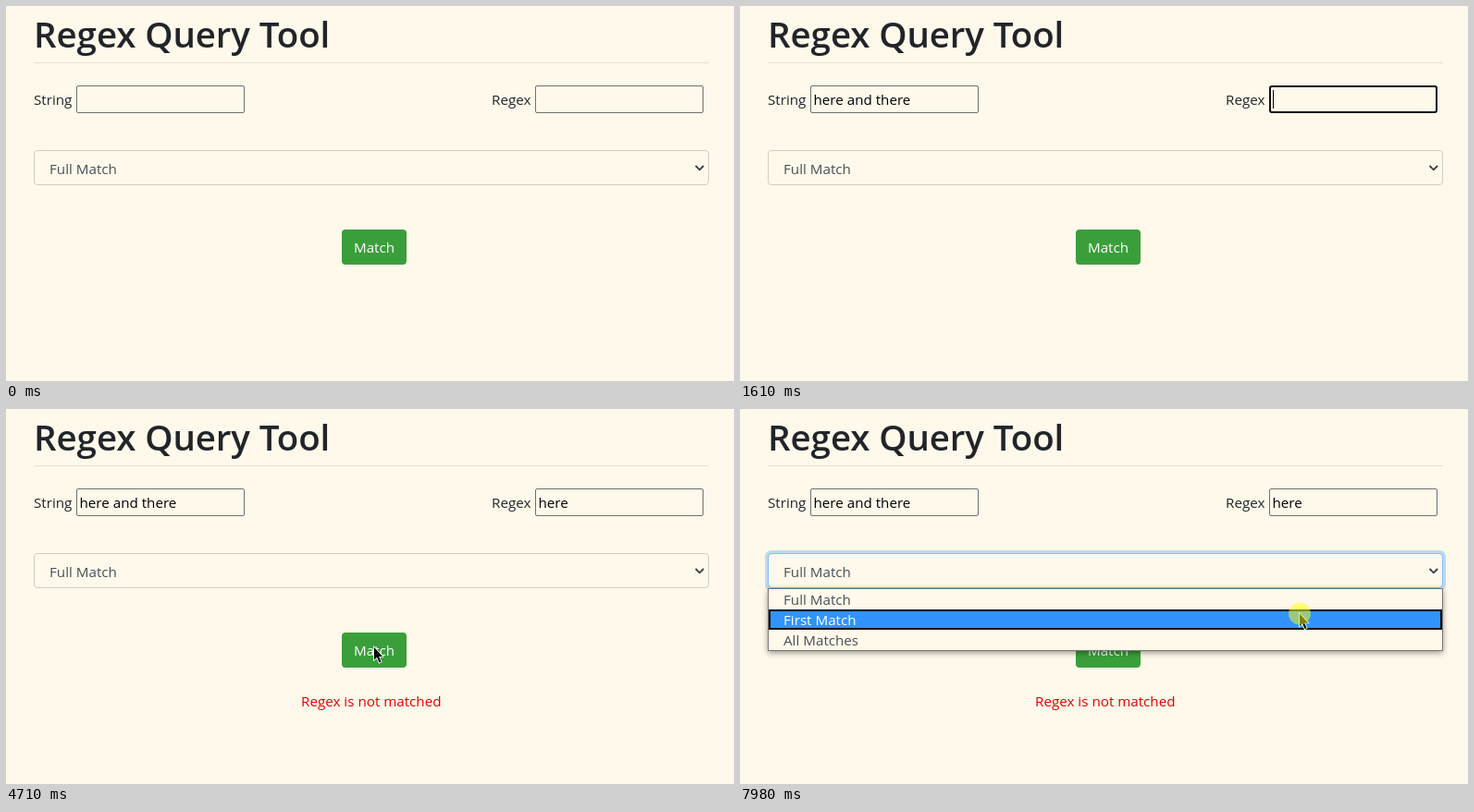
An HTML page that plays this animation: 787x406 px, repeating every 8 s.

```html
<!DOCTYPE html>
<html lang="en">
<head>
<meta charset="utf-8">
<title>Regex Query Tool</title>
<style>
html, body { margin: 0; width: 100%; height: 100%; overflow: hidden; background: #fff9eb; }
svg { display: block; }
text { font: 15.2px 'Open Sans', 'Noto Sans', sans-serif; fill: #212529; white-space: pre; }
.title { font-size: 38.5px; font-weight: 600; letter-spacing: -.1px; }
.typed { fill: #000; }
.opt { fill: #495057; }
.box { fill: none; stroke: #707070; }
.focus { fill: none; stroke: #101010; stroke-width: 2; }
.hint { font-size: 11.8px; font-weight: 700; letter-spacing: -.1px; fill: #ece9e2; }
.panel { fill: #292929; filter: drop-shadow(0 1px 1.5px rgba(0,0,0,.4)); }
.list { fill: #fff9eb; stroke: #767676; filter: drop-shadow(0 2px 3px rgba(0,0,0,.4)); }
</style>
</head>
<body>
<svg id="stage" width="787" height="406" viewBox="0 0 787 406">
  <text class="title" x="30" y="45">Regex Query Tool</text>
  <path d="M30 61.5H760" stroke="#000" stroke-opacity=".1"/>
  <text x="30" y="107">String</text>
  <text x="525" y="107">Regex</text>

  <rect x="30.5" y="156.5" width="729" height="37" rx="3.5" fill="none" stroke="#cfcdc6"/>
  <g id="ring" fill="none">
    <rect x="28.5" y="154.5" width="733" height="41" rx="5" stroke="#007bff" stroke-opacity=".25" stroke-width="3"/>
    <rect x="30.5" y="156.5" width="729" height="37" rx="3.5" stroke="#80bdff"/>
  </g>
  <text class="opt" x="47" y="182">Full Match</text>
  <path d="M745.5 173l4.3 4.3 4.3-4.3" fill="none" stroke="#343a40" stroke-width="1.8"/>

  <rect id="button" x="363" y="242" width="70" height="38" rx="4"/>
  <text x="398" y="267" text-anchor="middle" style="fill:#fff">Match</text>
  <text id="result" x="319" y="322" style="fill:#e00000">Regex is not matched</text>

  <g id="fields"></g>

  <g id="popup">
    <rect class="list" x="30.5" y="194.5" width="729" height="67"/>
    <rect id="row" x="32" width="726" height="20" fill="#3093ff" stroke="#101010" stroke-width="2"/>
  </g>

  <path id="arrow" d="M0 0V13.4L3 10.8 5.6 16.6 7.6 15.7 5.1 10H9Z" stroke="#fff" stroke-width="1.6" paint-order="stroke"/>
  <path id="beam" d="M-3-8H-1L0-7 1-8H3M0-7V7M-3 8H-1L0 7 1 8H3" fill="none" stroke="#222"/>
  <circle id="press" r="12" fill="#ff0" fill-opacity=".5"/>
</svg>
<script>
const LOOP = 8000;
const $ = id => document.getElementById(id);

function add(parent, tag, attrs, text = '') {
  const el = document.createElementNS('http://www.w3.org/2000/svg', tag);
  for (const k in attrs) el.setAttribute(k, attrs[k]);
  el.textContent = text;
  return parent.appendChild(el);
}
const show = (el, on) => el.setAttribute('visibility', on ? 'inherit' : 'hidden');
const within = (t, spans) => spans.some(([a, b]) => t >= a && t < b);
const ramp = (t, start) => Math.min(1, Math.max(0, (t - start) / 150));

const fields = [
  { x: 76, panelX: 75, value: 'here and there',
    keys: [460, 570, 680, 760, 910, 960, 1020, 1070, 1120, 1180, 1230, 1280, 1340, 1390],
    focus: [[210, 1490]], hints: ['here and there', 'Here and there', 'hello'], close: 1490 },
  { x: 572, panelX: 572, value: 'here',
    keys: [1640, 1890, 2050, 2190],
    focus: [[1490, 2990], [6590, 7290]], hints: ['here', 'here.*', 'h.*'], close: 2990 }
];

for (const f of fields) {
  const g = add($('fields'), 'g', {});
  f.box = add(g, 'rect', { class: 'box', x: f.x + .5, y: 86.5, width: 181, height: 29, rx: 1.5 });
  f.outline = add(g, 'rect', { class: 'focus', x: f.x + 1, y: 87, width: 180, height: 28, rx: 2 });
  f.text = add(g, 'text', { class: 'typed', x: f.x + 3.5, y: 107 });
  f.caret = add(g, 'rect', { y: 91, width: 1, height: 20 });
  f.menu = add(g, 'g', {});
  f.panel = add(f.menu, 'rect', { class: 'panel', x: f.panelX, y: 117, width: 192, rx: 4 });
  f.items = f.hints.map((s, i) =>
    add(f.menu, 'text', { class: 'hint', x: f.panelX + 12, y: 148 + 36 * i }, s));
}

const options = ['Full Match', 'First Match', 'All Matches'].map((s, i) =>
  add($('popup'), 'text', { class: 'opt', x: 47, y: 212 + 22 * i }, s));

// time, x, y of the pointer tip
const path = [
  [2290, 47, 241], [2470, 203, 227.5], [2690, 203, 227.5], [2960, 257, 188],
  [3460, 257, 188], [3660, 350, 219], [4060, 398, 258], [5060, 398, 258],
  [5160, 410, 240], [5860, 475, 175], [5960, 487, 172], [6500, 640, 101],
  [6790, 640, 101], [7290, 630, 179.5], [7610, 630, 179.5], [7900, 605, 221.5], [LOOP, 605, 221.5]
];
const presses = [[2990, 3190], [4360, 4560], [6570, 6690], [7320, 7520], [7930, LOOP]];

function pointer(t) {
  let i = 1;
  while (i < path.length - 1 && t > path[i][0]) i++;
  const [t0, x0, y0] = path[i - 1], [t1, x1, y1] = path[i];
  const k = Math.min(1, Math.max(0, (t - t0) / (t1 - t0)));
  return [x0 + (x1 - x0) * k, y0 + (y1 - y0) * k];
}

function drawField(f, t) {
  const n = f.keys.filter(k => k <= t).length;
  const focused = within(t, f.focus);
  const value = f.value.slice(0, n);
  if (f.text.textContent !== value) f.text.textContent = value;
  show(f.box, !focused);
  show(f.outline, focused);
  show(f.caret, focused);
  f.caret.setAttribute('x', Math.round(f.x + 3.5 + (n ? f.text.getComputedTextLength() : 0)));
  const rows = n > 1 ? 2 : 3;
  show(f.menu, n > 0 && t < f.close);
  f.panel.setAttribute('height', 16 + 36 * rows);
  show(f.items[2], n === 1 && t < f.close);
}

function draw(t) {
  fields.forEach(f => drawField(f, t));

  const [x, y] = pointer(t);
  const inField = x > 572 && x < 754 && y > 86 && y < 116;
  const visible = t >= path[0][0];
  show($('arrow'), visible && !inField);
  show($('beam'), visible && inField);
  show($('press'), within(t, presses));
  for (const id of ['arrow', 'beam', 'press'])
    $(id).setAttribute('transform', `translate(${x} ${y})`);

  $('ring').setAttribute('opacity', ramp(t, 2990) - ramp(t, 4360) + ramp(t, 7350));
  $('button').setAttribute('fill', t >= 3900 && t < 4610 ? '#218838' : '#3a9f3a');
  show($('result'), t >= 4610);

  const active = y >= 217 ? 1 : 0;
  show($('popup'), t >= 7340);
  $('row').setAttribute('y', 196 + 22 * active);
  options.forEach((o, i) => { o.style.fill = i === active ? '#fff' : ''; });
}

const start = performance.now();
function tick() {
  draw((performance.now() - start) % LOOP);
  requestAnimationFrame(tick);
}
tick();
</script>
</body>
</html>
```
